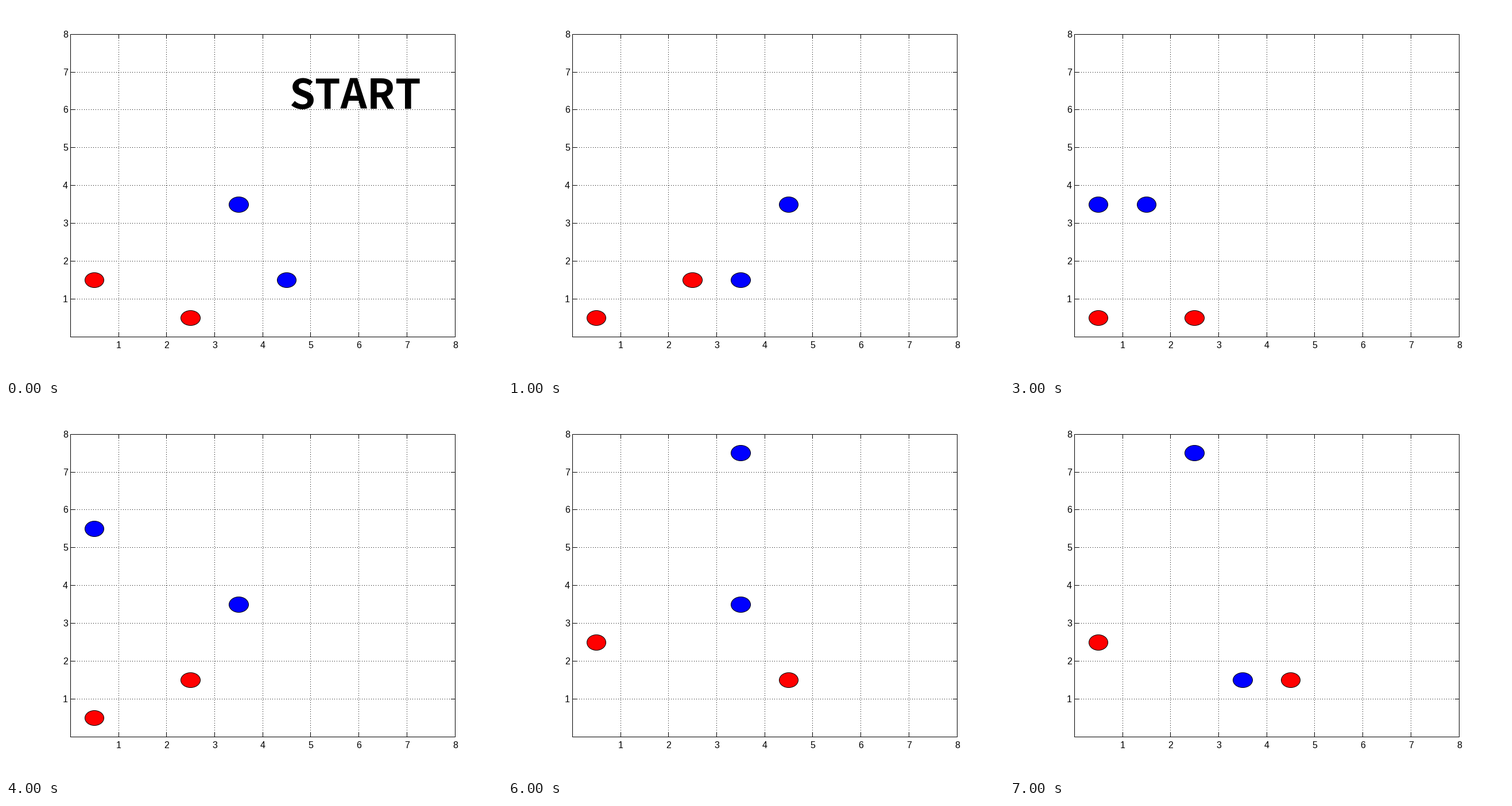
A matplotlib script for the animation above (8 s loop, 864x648 px).

```python
import math

import matplotlib.pyplot as plt
from matplotlib.animation import FuncAnimation
from matplotlib.patches import Ellipse

W, H = 864, 648
CELLS = 8
LEFT, WIDTH = 112.4, 669.7
BOTTOM, HEIGHT = 576.7, 527.65
TICK = 7
RADIUS = 0.2
RED, BLUE = "#ff0000", "#0000ff"

# Each piece: colour, first cell, and the unit steps it takes every second
WALKS = [
    (RED, (0, 1), "D - - - U U -"),
    (RED, (2, 0), "U D - U R R -"),
    (BLUE, (3, 3), "DD LL UU RR RR LL DD"),
    (BLUE, (4, 1), "UU LL LL UU RR UUR L"),
]


def px(x):
    """Centre of the pixel column at grid position x."""
    return math.floor(LEFT + x * WIDTH / CELLS) + 0.5


def py(y):
    """Centre of the pixel row at grid position y."""
    return math.floor(BOTTOM - y * HEIGHT / CELLS) + 0.5


fig = plt.figure(figsize=(W / 72, H / 72), dpi=72, facecolor="white")
ax = fig.add_axes([0, 0, 1, 1])
ax.set_xlim(0, W)
ax.set_ylim(H, 0)
ax.axis("off")


def line(xa, ya, xb, yb, **style):
    ax.plot([xa, xb], [ya, yb], color="black", lw=1, snap=False, **style)


def label(x, y, text, size, **style):
    return ax.text(x, y, text, fontsize=size, color="black", ha="center",
                   va="baseline", **style)


x0, x1, y0, y1 = px(0), px(CELLS), py(0), py(CELLS)
dots = dict(linestyle=(0, (1, 3)), dash_capstyle="butt")
solid = dict(solid_capstyle="projecting")

for k in range(1, CELLS + 1):
    x, y = px(k), py(k)
    if k < CELLS:
        line(x, y0 + 0.5, x, y1, **dots)
        line(x0 - 0.5, y, x1, y, **dots)
        for edge, inward in ((y0, -TICK), (y1, TICK)):
            line(x, edge, x, edge + inward, **solid)
        for edge, inward in ((x0, TICK), (x1, -TICK)):
            line(edge, y, edge + inward, y, **solid)
    label(x, 596, str(k), 16, family="Liberation Sans")
    label(103.5, y + 5.5, str(k), 16, family="Liberation Sans")

for x in (x0, x1):
    line(x, y0, x, y1, **solid)
for y in (y0, y1):
    line(x0, y, x1, y, **solid)

start = label(608, 179, "START", 72, family="Noto Sans CJK JP", weight="bold")

pieces = [ax.add_patch(Ellipse((0, 0), 1, 1, facecolor=color,
                               edgecolor="black", linewidth=1, snap=False,
                               zorder=3))
          for color, _, _ in WALKS]


def cell_at(first, walk, second):
    steps = "".join(walk.split()[:second])
    return (first[0] + steps.count("R") - steps.count("L"),
            first[1] + steps.count("U") - steps.count("D"))


def place(piece, cell):
    cx, cy = cell[0] + 0.5, cell[1] + 0.5
    left, right = px(cx - RADIUS), px(cx + RADIUS)
    top, bottom = py(cy + RADIUS), py(cy - RADIUS)
    piece.set_center(((left + right) / 2, (top + bottom) / 2))
    piece.width, piece.height = right - left, bottom - top


def update(second):
    start.set_visible(second == 0)
    for piece, (_, first, walk) in zip(pieces, WALKS):
        place(piece, cell_at(first, walk, second))
    return [start, *pieces]


anim = FuncAnimation(fig, update, frames=8, interval=1000, repeat=True,
                     repeat_delay=0, blit=False)
plt.show()
```
